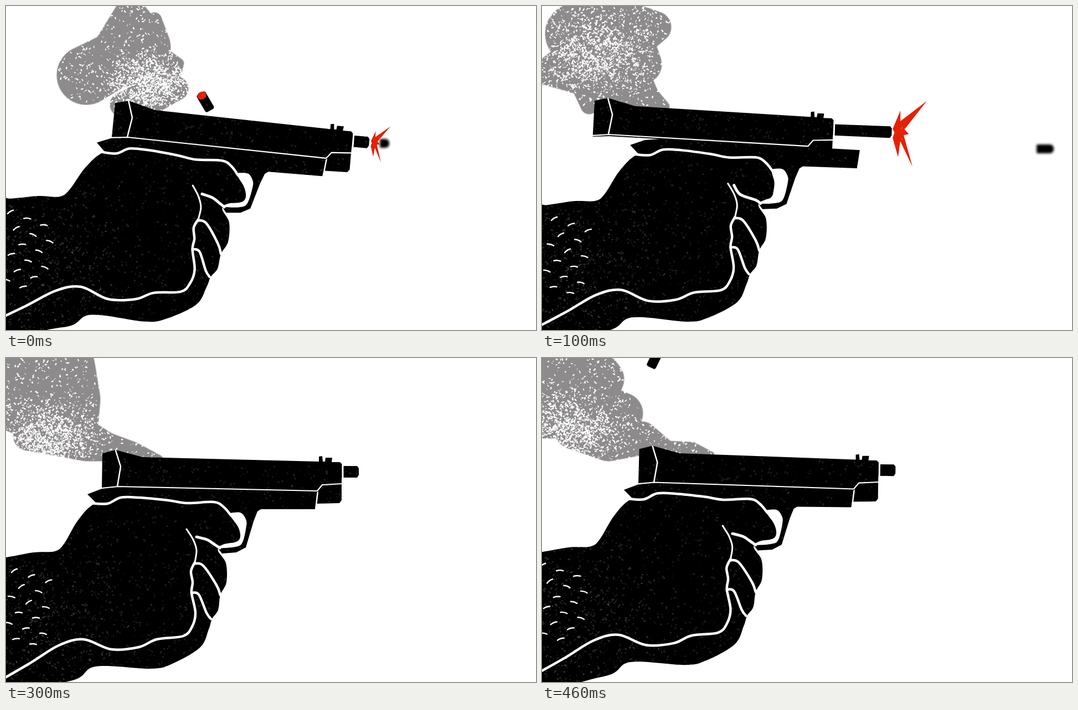
An HTML page with a canvas that plays this animation: 957x585 px, repeating every 500 ms.

```html
<!DOCTYPE html>
<html lang="en">
<head>
<meta charset="utf-8">
<title>Recoil</title>
<style>
html, body { margin: 0; overflow: hidden; background: #fff; }
canvas { display: block; }
</style>
</head>
<body>
<canvas id="stage" width="957" height="585"></canvas>
<script>
const ctx = document.getElementById('stage').getContext('2d');
const RED = '#e32105', GREY = '#8e8b8c', RAD = Math.PI / 180;
const nums = s => s.trim().split(/[\s,]+/).map(Number);
const poly = s => new Path2D('M' + s + 'z');

// Smooth path through every point
function curve(s, closed) {
  const v = nums(s), n = v.length / 2, path = new Path2D();
  const at = i => closed ? (i + n) % n : Math.min(Math.max(i, 0), n - 1);
  const pt = i => [v[at(i) * 2], v[at(i) * 2 + 1]];
  const handle = (i, sign) => pt(i).map((c, k) => c + sign * (pt(i + 1)[k] - pt(i - 1)[k]) / 6);
  path.moveTo(...pt(0));
  for (let i = 0; i < (closed ? n : n - 1); i++)
    path.bezierCurveTo(...handle(i, 1), ...handle(i + 1, -1), ...pt(i + 1));
  return path;
}

const slide = poly('173 237 174 172 198 166 247 179 565 187 565 178 571 177 572 187 576 187 577 180 589 180 588 188 603 188 607 192 606 229 572 231 563 242 202 235');
const block = poly('480 235 571 229 606 227 606 257 602 262 561 263 480 262');
const barrel = poly('500 195 634 195 637 199 637 211 634 216 500 215');
const frame = poly('147 246 173 236 202 233 563 240 558 273 460 273 454 277 447 295 433 342 416 351 390 353 383 344 300 300 163 262');
const hand = curve(`-60 368 0 360 50 351 88 349 105 335 130 293 160 263 207 252 327 262 380 261 418 303 420 333 383 344
  397 370 398 405 387 428 383 455 372 471 366 490 350 523 298 553 260 561 162 557 112 584 -60 598`, true);
const burst = poly('97 -102 31 -11 45 3 29 7 60 105 19 26 14 76 -5 17 0 0 -6 -11 16 -69 17 -36');
const slideSeam = new Path2D('M173 235L202 232 562 240 571 229 606 227');
const rearSeam = new Path2D('M198 167L207 196 201 232');
const creases = [
  '153 262 183 263 207 252 240 252 293 257 327 262 375 260 393 269 406 284',
  '341 369 334 385 337 405 335 424 342 460 336 485 320 502 272 508 240 522 190 526 140 508 95 519 40 553 -40 599',
  '341 371 356 375 380 410 387 428',
  '335 424 348 427 362 460 370 471'
].map(s => curve(s));

// gun: angle, x, y; kick: slide travel; flash: burst size;
// smoke: x, y, radius along the cloud; glow: x, y, radius of the thin part
const poses = [
  { gun: [4.75, 220, 237], kick: 0, flash: .32, shell: [360, 173, 60], glow: [260, 142, 75],
    smoke: '145 125 53 200 95 50 225 20 32 245 75 52 268 25 13 250 110 50 311 104 10 285 140 25 308 149 21 265 163 30 210 178 22' },
  { gun: [2.1, 214.6, 239], kick: 94, flash: .58, glow: [100, 85, 100],
    smoke: '60 50 54 130 40 55 205 38 28 160 60 40 181 105 35 90 100 58 0 120 20 90 120 45 85 180 15 150 130 45 190 165 22 220 182 10' },
  { gun: [.4, 210, 238.4], kick: 51.5, flash: 1, shell: [254, 79, 5], glow: [80, 105, 100],
    smoke: '40 40 95 130 18 51 132 85 34 95 120 48 87 172 20 150 150 30 200 172 20 236 184 9' },
  { gun: [0, 202, 232], kick: 0, flash: 0, glow: [80, 145, 85],
    smoke: '50 30 112 110 75 60 115 130 50 40 140 27 145 150 36 180 160 26 230 168 16 275 183 8' },
  { gun: [.64, 203, 224.5], kick: 0, flash: 0, shell: [204, 1, 116], glow: [50, 135, 90],
    smoke: '10 30 115 112 38 36 90 80 40 145 100 37 60 125 40 120 150 36 180 145 30 225 168 18 270 167 15 305 175 6' }
];

let seed;
const random = () => (seed = seed * 16807 % 2147483647) / 2147483647;
const around = (c, r) => c + (random() + random() + random() - 1.5) * r;

function grain(count, colour, place) {
  ctx.strokeStyle = colour;
  for (const width of [1, 1.6, 2.3]) {
    ctx.lineWidth = width;
    ctx.beginPath();
    for (let i = 0; i < count / 3; i++) {
      const [x, y] = place();
      ctx.moveTo(x, y);
      ctx.lineTo(x + random() * 5 - 2.5, y + random() * 5 - 2.5);
    }
    ctx.stroke();
  }
}

function line(width, path) {
  ctx.strokeStyle = '#fff';
  ctx.lineWidth = width;
  ctx.stroke(path);
}

function placed(x, y, angle, draw) {
  ctx.save();
  ctx.translate(x, y);
  ctx.rotate(angle * RAD);
  draw();
  ctx.restore();
}

function drawHand(pull) {
  ctx.fill(hand);
  creases.forEach(crease => line(4.5, crease));
  line(3, curve('326 309 338 328 344 347 341 369'));
  line(5, curve(`${344 - pull / 2} ${323 - pull * .8} ${363 - pull} 328 377 337 386 343`));
  ctx.fillStyle = '#fff';
  ctx.fill(curve(`404 283 412 279 425 280 433 291 434 303 427 333 414 341 383 343 394 336
    ${412 - pull * .7} 333 ${421 - pull} 328 ${423 - pull} 318 ${418 - pull * .6} 303`, true));
}

function drawHairs(odd) {
  for (let i = 0; i < 15; i++) {
    const x = (i * 31 + odd * 13) % 80 + 2, y = 384 + i * 9.5;
    placed(x, y, random() * 60 - 40, () => line(2.4, new Path2D('M-6 0Q0 -2 6 0')));
  }
}

function drawGun({ gun: [angle, x, y], kick, flash }, step) {
  const push = -kick * .2;
  placed(x, y, angle, () => {
    ctx.translate(-202, -232);
    placed(push, 0, 0, () => ctx.fill(barrel));
    placed(-kick, -kick * .038, 0, () => ctx.fill(block));
    ctx.fill(frame);
    line(2.5, new Path2D('M563 240L559 275'));
    placed(-kick, -kick * .038, 0, () => {
      ctx.fill(slide);
      line(2.2, slideSeam);
      line(2.5, rearSeam);
      line(3, new Path2D('M608 192V222'));
    });
    drawHand(kick ? 14 : 0);
    drawHairs(step % 2);
    ctx.translate(642 + push, 206);
    ctx.scale(flash, flash);
    ctx.fillStyle = RED;
    ctx.fill(burst);
  });
}

function drawShell([x, y, angle]) {
  placed(x, y, angle, () => {
    ctx.fillStyle = '#000';
    ctx.beginPath();
    ctx.roundRect(-18, -9, 36, 18, 4);
    ctx.fill();
    ctx.fillStyle = RED;
    ctx.beginPath();
    ctx.ellipse(-13, 0, 8 * Math.sin(angle * RAD), 8.5, 0, 0, 7);
    ctx.fill();
  });
}

function drawBullet(step) {
  ctx.save();
  ctx.filter = 'blur(2px)';
  ctx.fillStyle = '#000';
  ctx.beginPath();
  ctx.roundRect(675 + 218 * step, 240 + 10 * step, 17 + 14 * step, 16, [2, 7, 7, 2]);
  ctx.fill();
  ctx.restore();
}

function drawSmoke({ smoke, glow: [x, y, r] }) {
  grain(1300, '#fff', () => [around(x, r), around(y, r * .7)]);
  grain(700, '#fff', () => [random() * 310, random() * 180]);
  const v = nums(smoke), cloud = new Path2D(), parts = 12;
  for (let i = 0; i + 3 < v.length; i += 3)
    for (let k = 0; k <= parts; k++) {
      const [cx, cy, radius] = [0, 1, 2].map(j => v[i + j] + (v[i + j + 3] - v[i + j]) * k / parts);
      cloud.moveTo(cx + radius, cy);
      cloud.arc(cx, cy, radius, 0, 7);
    }
  ctx.fillStyle = GREY;
  ctx.fill(cloud);
  ctx.strokeStyle = '#c9c7c8';
  ctx.lineWidth = 2;
  ctx.stroke(cloud);
}

function draw(step) {
  const pose = poses[step];
  seed = 7919 * (step % 2 + 1);
  ctx.clearRect(0, 0, 957, 585);
  ctx.lineCap = ctx.lineJoin = 'round';
  ctx.fillStyle = '#000';
  drawGun(pose, step);
  if (pose.shell) drawShell(pose.shell);
  ctx.globalCompositeOperation = 'source-atop';
  grain(1800, 'rgba(255,255,255,.13)', () => [random() * 720, 150 + random() * 435]);
  grain(500, 'rgba(255,255,255,.18)', () => [around(60, 150), around(470, 160)]);
  ctx.globalCompositeOperation = 'destination-over';
  drawBullet(step);
  drawSmoke(pose);
  ctx.globalCompositeOperation = 'source-over';
}

let shown = -1;
function tick() {
  const step = Math.floor(performance.now() % 500 / 100);
  if (step !== shown) draw(shown = step);
  requestAnimationFrame(tick);
}
tick();
</script>
</body>
</html>
```
